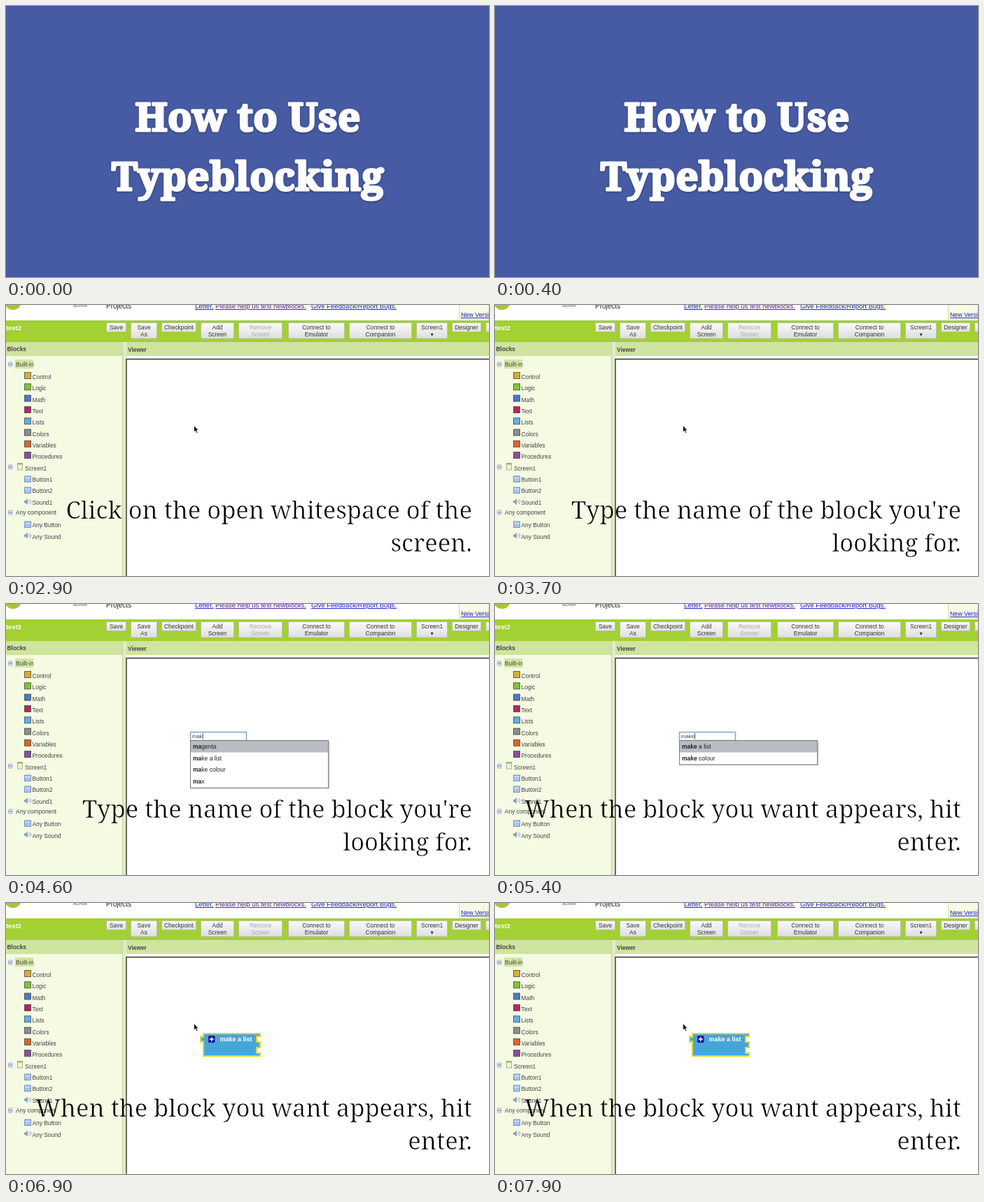
Recreate the animation shown at these times as an HTML page. Size 690 by 388 pixels, loop 8000 ms.

```html
<!DOCTYPE html>
<html lang="en">
<head>
<meta charset="utf-8">
<title>How to Use Typeblocking</title>
<style>
html, body { margin: 0; width: 100%; height: 100%; overflow: hidden; background: #fff; }
svg { display: block; width: 100%; height: 100%; font: 8.4px "Liberation Sans", Arial, sans-serif; fill: #444; }
.b { font-weight: bold; }
.mid { text-anchor: middle; }
.link { fill: #1a1ac4; text-decoration: underline; }
.title { font: bold 56.5px "Noto Serif", serif; fill: #fff; stroke: #fff; stroke-width: 3px; stroke-linejoin: round;
  letter-spacing: .4px; text-anchor: middle; filter: drop-shadow(0 1.5px 1.5px #0005); }
/* the dark outline trims the mask to a light weight */
.caption { font: 300 34.5px "Noto Serif", serif; fill: #fff; stroke: #000; stroke-width: .7px; text-anchor: end; }
</style>
</head>
<body>
<svg viewBox="0 0 690 388">
  <defs>
    <linearGradient id="btn" x2="0" y2="1"><stop stop-color="#fafafa"/><stop offset="1" stop-color="#dedede"/></linearGradient>
    <mask id="caption" maskUnits="userSpaceOnUse" x="0" y="260" width="690" height="128">
      <text class="caption" id="line1" x="666" y="306"></text>
      <text class="caption" id="line2" x="666" y="353"></text>
    </mask>
  </defs>
  <g id="app">
    <rect width="690" height="388" fill="#fff"/>
    <circle cx="10" cy="-5" r="12" fill="#a4c639"/>
    <text x="96" y="3" font-size="6">ALPHA</text>
    <text x="143" y="5" font-size="10" fill="#222">Projects</text>
    <g font-size="9.5">
      <text class="link" x="270" y="5">Letter,</text>
      <text class="link" x="299" y="5" style="fill:#4a1a9c">Please help us test newblocks.</text>
      <text class="link" x="436" y="5">Give Feedback/Report Bugs.</text>
    </g>
    <path d="M647.5 0V20.5H690V0" fill="#f7fbe6" stroke="#cbdca0"/>
    <text class="link" x="650" y="17" font-size="8.8">New Version</text>
    <rect y="22" width="690" height="31" fill="#a3d032"/>
    <text class="b" x="0" y="36" font-size="9.4" fill="#fff">test2</text>
    <g id="buttons"></g>
    <rect y="53" width="690" height="20" fill="#cfe49f"/>
    <rect y="73" width="167" height="315" fill="#f5fae3"/>
    <rect x="166" y="53" width="6" height="335" fill="#e1ebc9"/>
    <path d="M166.5 53V388" stroke="#c3d3a0"/>
    <text class="b" x="1.5" y="66">Blocks</text>
    <text class="b" x="174" y="66.5">Viewer</text>
    <path d="M172 388V77.5H690" fill="none" stroke="#333" stroke-width="1.4"/>
    <rect x="13" y="78" width="26" height="13" fill="#d2e6a2"/>
    <g id="tree"></g>
    <g id="popup">
      <rect x="263.5" y="183.5" width="80" height="12" fill="#fff" stroke="#78a6d6" stroke-width="1.5"/>
      <text id="typed" x="265.5" y="192" font-size="8"></text>
      <path id="caret" stroke="#222" stroke-width=".8"/>
      <g id="menu"></g>
    </g>
    <g id="block">
      <path d="M282 187H363V191H358V199H363V207H358V215H363V219H282V198L278 199V191L282 192Z" fill="#46a6da" stroke="#e8d52c" stroke-width="2"/>
      <rect x="289" y="190" width="9.5" height="10" rx="1.5" fill="#1a1a9e"/>
      <path d="M293.75 192V198M290.75 195H296.75" stroke="#fff" stroke-width="1.4"/>
      <text class="b" x="305.5" y="198" font-size="9" fill="#fff">make a list</text>
    </g>
    <path id="cursor" d="M268.5 172.500V182L270.700 180L272.300 183.500L273.800 182.800L272.300 179.500H275Z" fill="#111" stroke="#fff" stroke-width=".6"/>
    <rect y="260" width="690" height="128" fill="#000" mask="url(#caption)"/>
  </g>
  <g id="intro">
    <rect width="690" height="388" fill="#465ba4"/>
    <text class="title" x="345.5" y="178.5">How to Use</text>
    <text class="title" x="345.5" y="263.5">Typeblocking</text>
  </g>
</svg>
<script>
const $ = id => document.getElementById(id);
const show = (id, on) => $(id).setAttribute('visibility', on ? 'visible' : 'hidden');
const text = (x, y, s, extra = '') => `<text x="${x}" y="${y}" ${extra}>${s}</text>`;
const rect = (x, y, w, h, extra) => `<rect x="${x}" y="${y}" width="${w}" height="${h}" ${extra}/>`;

// Toolbar: left, right, label lines
$('buttons').innerHTML = [
  [143, 172, 'Save'], [178, 216, 'Save', 'As'], [222, 272, 'Checkpoint'],
  [278, 326, 'Add', 'Screen'], [332, 395, 'Remove', 'Screen'],
  [403, 484, 'Connect to', 'Emulator'], [490, 580, 'Connect to', 'Companion'],
  [586, 631, 'Screen1', '▾'], [637, 679, 'Designer'], [685, 720, '']
].map(([l, r, ...lines]) =>
  rect(l + .5, 25.5, r - l - 1, lines.length > 1 ? 22.5 : 13, 'fill="url(#btn)" stroke="#b9c2a4"') +
  lines.map((s, i) => text((l + r) / 2, 35 + i * 10, s,
    `class="mid" fill="${lines[0] === 'Remove' ? '#aaa' : '#333'}"`)).join('')
).join('');

// Sidebar
const toggle = y => rect(3.5, y - 3, 5.5, 6, 'rx="1" fill="#e8ecfa" stroke="#8c96cc" stroke-width=".8"') +
  `<path d="M4.5 ${y}H8" stroke="#44539c"/>`;
const palette = { Control: '#d6ae34', Logic: '#82c336', Math: '#4a78cc', Text: '#b3265f',
  Lists: '#5cb2e6', Colors: '#8b8f8b', Variables: '#d9652e', Procedures: '#85509a' };
const buttonIcon = y => rect(26.5, y - 8, 9, 8.5, 'fill="#a9c4ee" stroke="#7795c8"') +
  `<path d="M27 ${y - 5.5}H35" stroke="#dce8fb"/>`;
const soundIcon = y => `<path d="M26 ${y - 6}H28L31 ${y - 9}V${y}L28 ${y - 2.5}H26Z" fill="#8ba0c0"/>
  <path d="M32.5 ${y - 6.5}q1.5 2 0 4M34.5 ${y - 8}q2.5 3.5 0 7" fill="none" stroke="#7795d8" stroke-width=".8"/>`;
$('tree').innerHTML = toggle(85) + text(14, 88, 'Built-in') +
  Object.entries(palette).map(([name, color], i) => {
    const y = 106 + i * 16.3;
    return rect(26.5, y - 9.5, 9, 9, `fill="${color}" stroke="#3c3c3c" stroke-opacity=".75"`) + text(37.5, y, name);
  }).join('') +
  toggle(232) + rect(16.5, 226.5, 7, 9.5, 'fill="#eef2d8" stroke="#a8b68c"') +
  rect(16, 226, 8, 2.5, 'fill="#9fb86a"') + text(27, 236.5, 'Screen1') +
  buttonIcon(253) + text(37.5, 253, 'Button1') +
  buttonIcon(269) + text(37.5, 269, 'Button2') +
  soundIcon(286) + text(37.5, 286, 'Sound1') +
  toggle(297) + text(14, 300, 'Any component') +
  buttonIcon(318) + text(37.5, 318, 'Any Button') +
  soundIcon(334.5) + text(37.5, 334.5, 'Any Sound');

const menu = (items, bold, picked) => {
  const h = items.length * 16.7 + 1;
  return rect(264, 197, 199, h, 'fill="#0002"') +
    rect(263.5, 195.5, 197, h, 'fill="#fff" stroke="#777"') +
    items.map((s, i) => {
      const y = 207 + i * 16.7;
      return (i === picked ? rect(264, y - 11, 196, 16.5, 'fill="#b9bcc3"') : '') +
        text(267, y, `<tspan class="b">${s.slice(0, bold)}</tspan>${s.slice(bold)}`, 'font-size="8.5" fill="#222"');
    }).join('');
};

const captions = [
  [1800, 'Click on the open whitespace of the', 'screen.'],
  [3600, "Type the name of the block you're", 'looking for.'],
  [5000, 'When the block you want appears, hit', 'enter.']
];
const keys = [4200, 4300, 4500, 4700];   // one per letter of "make"
const openAt = 4100, blockAt = 5600, cursorBack = 6800;

function draw(t) {
  show('intro', t < 1800);
  if (t < 1800) {
    ['popup', 'block'].forEach(id => show(id, false));
    return;
  }
  const [, a, b] = captions.filter(c => t >= c[0]).pop();
  $('line1').textContent = a;
  $('line2').textContent = b;

  const typing = t >= openAt && t < blockAt;
  const typed = 'make'.slice(0, keys.filter(k => t >= k).length);
  show('popup', typing);
  show('block', t >= blockAt);
  show('cursor', t < openAt || t >= cursorBack);
  if (!typing) return;
  $('typed').textContent = typed;
  const x = 266 + $('typed').getComputedTextLength();
  $('caret').setAttribute('d', `M${x} 185V193.5`);
  // the list lags one step behind the keys
  $('menu').innerHTML = t < 4400 ? ''
    : t < 4700 ? menu(['magenta', 'make a list', 'make colour', 'max'], 2, 0)
    : menu(['make a list', 'make colour'], t < 4800 ? 3 : 4, 0);
}

const start = performance.now();
(function tick() {
  draw((performance.now() - start) % 8000);
  requestAnimationFrame(tick);
})();
</script>
</body>
</html>
```
